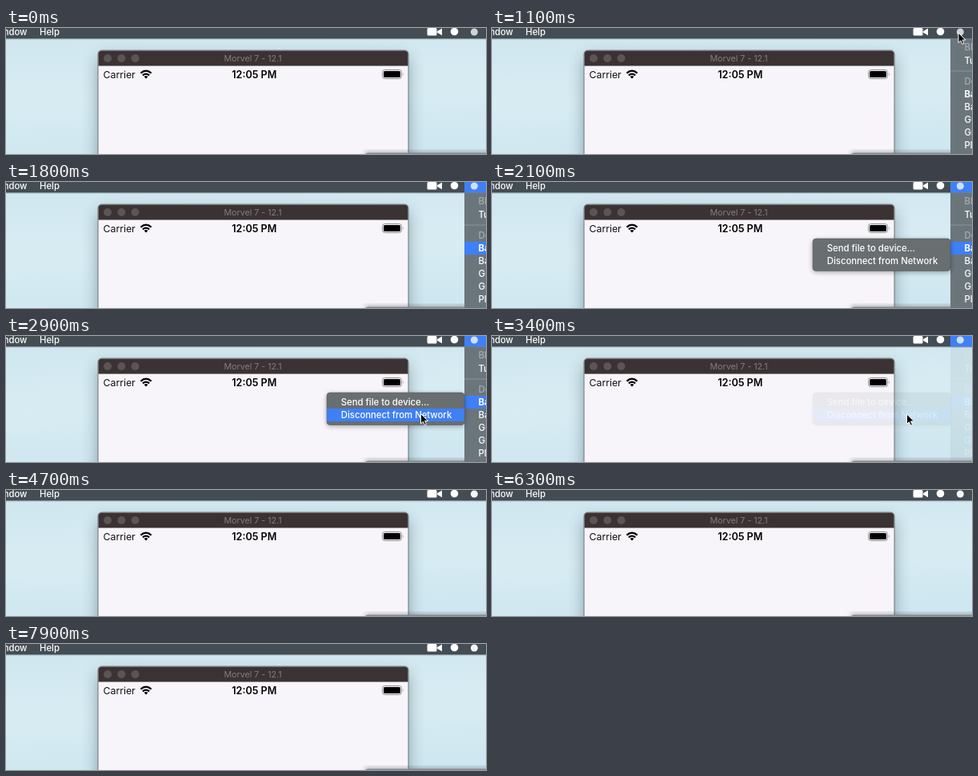
Recreate the animation shown at these times as an HTML page. Size 600x158 px, loop 8 s.

```html
<!DOCTYPE html>
<html lang="en">
<head>
<meta charset="utf-8">
<title>Menu bar disconnect</title>
<style>
  html, body { margin: 0; width: 100%; height: 100%; overflow: hidden; }
  svg { display: block; width: 600px; height: 158px; }
  text { font-family: Inter, Roboto, sans-serif; font-size: 11.3px; fill: #fff; white-space: pre; }
  .menu text { font-weight: 500; }
  .menu .dim { fill: #a5adb2; }
  .blue { fill: #3f80f6; }
</style>
</head>
<body>
<svg viewBox="0 0 600 158">
  <defs>
    <linearGradient id="sky" x1="0" y1="0" x2="0.15" y2="1">
      <stop offset="0" stop-color="#cfe6ef"/>
      <stop offset="0.6" stop-color="#d8ecf3"/>
      <stop offset="1" stop-color="#cfe7f0"/>
    </linearGradient>
    <filter id="soft" x="-20%" y="-30%" width="140%" height="160%">
      <feGaussianBlur stdDeviation="10"/>
    </filter>
    <filter id="near" x="-20%" y="-30%" width="140%" height="160%">
      <feGaussianBlur stdDeviation="3"/>
    </filter>
  </defs>

  <rect width="600" height="158" fill="url(#sky)"/>

  <!-- simulator window -->
  <rect x="115" y="38" width="388" height="150" fill="#1c3540" opacity=".42" filter="url(#soft)"/>
  <path d="M115 170V33q0-5 5-5H498q5 0 5 5V170z" fill="#f7f5f9" stroke="#6f7577"/>
  <path d="M115.5 47.5V33q0-4.5 4.5-4.5H498q4.500 0 4.500 4.500V47.500z" fill="#3a3233"/>
  <g fill="#5c5455">
    <circle cx="127" cy="38" r="5"/><circle cx="144.300" cy="38" r="5"/><circle cx="161.500" cy="38" r="5"/>
  </g>
  <text x="308.500" y="42" text-anchor="middle" style="font-size:10.700px;fill:#857d7e">Morvel 7 - 12.1</text>
  <text x="121.500" y="62.500" style="font-size:12.300px;fill:#111">Carrier</text>
  <text x="310.300" y="62.500" text-anchor="middle" style="font-size:12.600px;font-weight:600;fill:#000">12:05 PM</text>
  <g fill="none" stroke="#000" stroke-width="2.200">
    <path d="M168.400 56.600Q175 50.800 181.600 56.600"/>
    <path d="M170.900 59.400Q175 55.800 179.100 59.400"/>
  </g>
  <path d="M172.600 60.900Q175 59 177.400 60.900L175 63.400z"/>
  <rect x="470.500" y="52.500" width="24" height="11" rx="3" fill="none" stroke="#8f8d91"/>
  <rect x="472" y="54" width="21" height="8" rx="1.600"/>
  <path d="M496 56.300q1.800 1.700 0 3.400z" fill="#8f8d91"/>

  <!-- window edge below -->
  <rect x="449" y="155" width="170" height="10" fill="#30383c" opacity=".35" filter="url(#near)"/>
  <path d="M449 158q1-1.500 4-1.500H600V158z" fill="#83898c"/>

  <!-- menu bar -->
  <rect y="13" width="600" height="1.500" fill="#8fa3ab" opacity=".6"/>
  <rect width="600" height="13.300" fill="#444d53"/>
  <g font-weight="500">
    <text x="26.500" y="8.500" text-anchor="end">Window</text>
    <text x="42" y="8.500">Help</text>
  </g>
  <rect id="tab" class="blue" x="573" y="0" width="27" height="13.300"/>
  <g fill="#fff">
    <rect x="526.500" y="0" width="12" height="9.500" rx="1.500"/>
    <path d="M539 4L545 .4V9.200L539 5.700z"/>
    <circle cx="560.500" cy="4.500" r="4.800"/>
    <circle id="link" cx="585.300" cy="5" r="4.500"/>
  </g>

  <g id="menu" class="menu">
    <rect x="573" y="13.300" width="40" height="150" fill="#6b767c"/>
    <rect x="573" y="53.500" width="27" height="1" fill="#89949a"/>
    <rect id="row" class="blue" x="573" width="27" height="16"/>
    <g id="items"></g>
  </g>

  <g id="sub" class="menu">
    <rect x="401" y="73" width="172" height="40" rx="4" fill="#000" opacity=".35" filter="url(#near)"/>
    <rect x="401" y="71" width="172" height="40.500" rx="4" fill="#696e71" stroke="#565b5e" stroke-width=".6"/>
    <rect id="pick" class="blue" x="401" width="172" height="16"/>
    <text x="418.800" y="87">Send file to device...</text>
    <text x="418.800" y="103">Disconnect from Network</text>
  </g>

  <path id="arrow" d="M0 0V12.500L2.900 9.800L4.900 14.300L7 13.400L5 9H9z" fill="#000" stroke="#fff" stroke-width="1" stroke-linejoin="round"/>
</svg>
<script>
  const LOOP = 8000, STEP = 100;
  const $ = id => document.getElementById(id);
  const tab = $('tab'), link = $('link'), menu = $('menu'), row = $('row');
  const sub = $('sub'), pick = $('pick'), arrow = $('arrow');

  const items = [
    ['Bl', 28, 'dim'], ['Tu', 45], ['De', 71, 'dim'], ['Ba', 87, 'bold'],
    ['Ba', 103], ['Gu', 119], ['Gr', 135], ['Pl', 151]
  ];
  $('items').innerHTML = items.map(([label, y, kind = '']) =>
    `<text x="590.5" y="${y}" class="${kind}"${kind === 'bold' ? ' style="font-weight:700"' : ''}>${label}</text>`
  ).join('');

  // pointer path: time, x, y
  const path = [
    [300, 520, 170], [900, 583, 6], [1200, 583, 6], [1600, 602, 40], [1900, 606, 82],
    [2200, 604, 82], [2800, 518.500, 97.500], [3600, 518.500, 98], [4300, 516, 170]
  ];

  const ease = k => k * k * (3 - 2 * k);
  const within = (t, from, to) => t >= from && t < to;
  const show = (el, on) => el.setAttribute('visibility', on ? 'visible' : 'hidden');

  function pointer(t) {
    const i = path.findIndex(p => p[0] > t);
    if (i < 1) return [-30, -30];
    const [t0, x0, y0] = path[i - 1], [t1, x1, y1] = path[i];
    const k = ease((t - t0) / (t1 - t0));
    return [x0 + (x1 - x0) * k, y0 + (y1 - y0) * k];
  }

  function draw(time) {
    const t = Math.floor(time % LOOP / STEP) * STEP;
    const [x, y] = pointer(t);
    arrow.setAttribute('transform', `translate(${x} ${y})`);

    const fade = t < 3200 ? 1 : Math.max(0, (3500 - t) / 300) ** 2.200;
    menu.setAttribute('opacity', within(t, 1000, 3500) ? fade : 0);
    sub.setAttribute('opacity', within(t, 2000, 3500) ? fade : 0);

    show(tab, within(t, 1300, 3500));
    show(row, within(t, 1500, 3500));
    row.setAttribute('y', t < 1800 ? 33 : 75);

    const blink = t === 3100;
    show(pick, within(t, 2200, 3500) && x < 573 && !blink);
    pick.setAttribute('y', y < 91 ? 75 : 91);

    link.setAttribute('opacity', t < 4000 ? .75 : .95);
  }

  const start = performance.now();
  function tick() {
    draw(performance.now() - start);
    requestAnimationFrame(tick);
  }
  tick();
</script>
</body>
</html>
```
